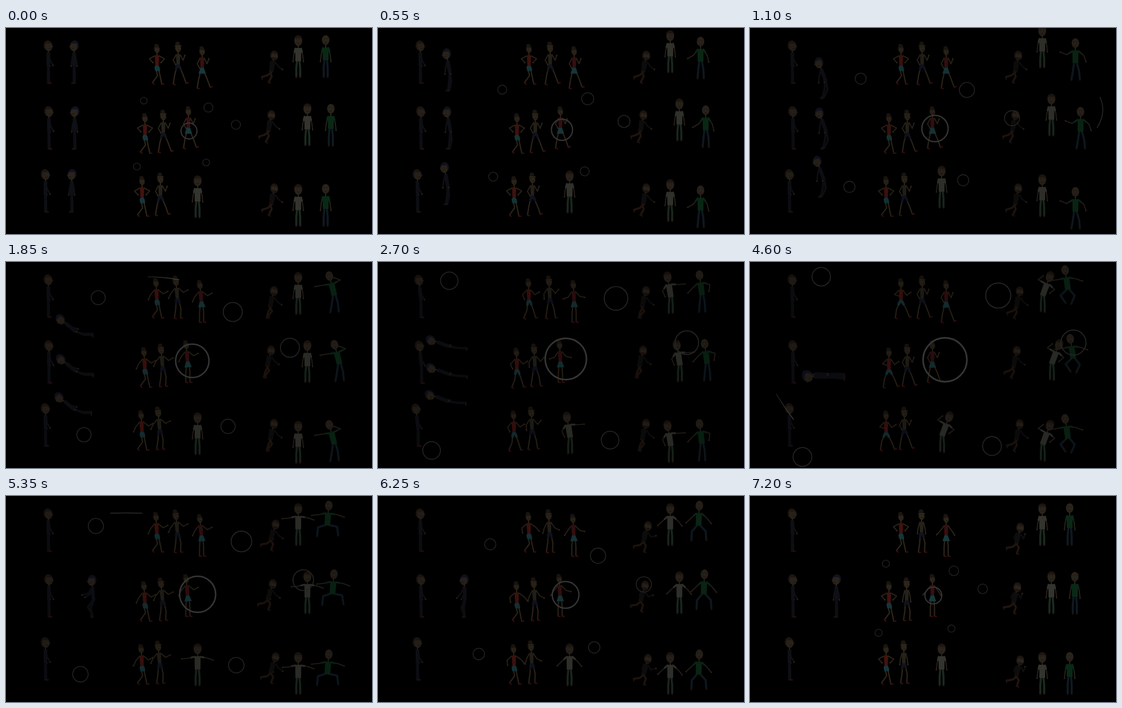
These frames come from a looping animation (640 by 360 pixels, 7.25 s). An HTML page with a canvas:

```html
<!DOCTYPE html>
<html lang="en">
<head>
<meta charset="utf-8">
<title>Dancing people and rings</title>
<style>
html, body { margin: 0; width: 100%; height: 100%; overflow: hidden; background: #000; }
canvas { display: block; width: 640px; height: 360px; }
</style>
</head>
<body>
<canvas id="stage" width="640" height="360"></canvas>
<script>
const ctx = document.getElementById('stage').getContext('2d');
const LOOP = 7250, PEAK = 3830;
const BEATS = [0, 1100, 1850, 3550, 4600, 5350, 7200];

// Limb angles in degrees from straight down, positive to the right:
// left upper, left lower, right upper, right lower
const ARMS = {
  hang: [-14, -6, 14, 6],
  front: [0, 18, 8, 30],
  hips: [-62, 42, 62, -42],
  tuck: [-28, 30, 28, 160],
  jog: [-45, 72, 35, 125],
  dance: [-38, -24, 50, 118],
  flare: [-38, -42, 36, 32],
  offer: [-28, -118, 34, 38],
  low: [-8, 30, 34, 54],
  wide: [-78, -84, 80, 70],
  sway: [-48, 56, 162, 184],
  pose: [-118, 128, 48, -52],
  box: [-58, -112, 52, 20],
  point: [-82, -80, 116, -110],
  open: [-16, -4, 30, 92],
  fly: [62, 74, 42, 58],
  flat: [88, 92, 82, 96],
  reach: [-35, -75, -24, -58]
};
const LEGS = {
  straight: [-5, 0, 5, 0],
  close: [0, 0, 2, 1],
  step: [12, -36, 12, 12],
  stride: [-14, -9, 23, 20],
  wide: [-22, -8, 28, 22],
  amble: [-4, -8, 13, -2],
  kneel: [14, -28, -48, -72],
  perch: [30, -40, -30, -14],
  run: [34, -18, -52, -80],
  stoop: [-6, -14, 10, -26],
  trail: [75, 92, 66, 88],
  lie: [88, 84, 92, 88],
  squat: [-36, 32, -20, 14],
  lean: [-8, -10, 16, 6],
  jump: [-46, 34, 40, -24],
  lunge: [-72, -6, 78, 8]
};

// One beat: arms, legs, shift of the hips, lean to the left
const beat = (arms, legs, x = 0, y = 0, lean = 0) =>
  [x, y, lean, ...ARMS[arms], ...LEGS[legs]];

const upright = beat('front', 'close');
const akimbo = beat('hips', 'step');
const skip = beat('dance', 'step', 0, 0, 3);
const jog = beat('jog', 'wide');
const walk = beat('tuck', 'stride');
const reach = beat('dance', 'amble', -1, 0, 5);
const bounce = beat('dance', 'straight', -1, 0, 5);
const kneel = beat('low', 'kneel', 0, 0, -11);
const perch = beat('low', 'perch', -2, 2, -14);
const idle = beat('hang', 'straight');

// size: neck, torso, upper arm, forearm, thigh, shin
const man = { skin: '#2a231b', hair: '#1d1510', shoe: '#1e1310', face: 0,
  head: [7.2, 9], size: [14, 21, 12, 11, 14, 14], wide: 11 };
const suited = { ...man, top: '#0f1016', leg: '#0e0f14', sleeve: 1,
  head: [7, 9], size: [13, 21, 12, 11, 16, 15], wide: 7 };
const woman = { skin: '#2f261a', hair: '#1c1610', leg: '#2f261a', shoe: '#3c0f12', face: .5,
  bun: 2.5, head: [4.8, 6.3], size: [12, 20, 11, 9, 15, 15], wide: 8 };

const faller = { ...suited, hair: '#12121f', face: -1, hip: [120, 211], beats: [
  beat('hang', 'close'), beat('hang', 'stoop', 13, 0, 20), beat('fly', 'trail', 2, -13, 50),
  beat('flat', 'lie', 7, -9, 88), beat('flat', 'lie', 14, -10, 88),
  beat('reach', 'squat', 33, 0, 5), beat('hang', 'close', 31)] };

const people = [
  { ...suited, skin: '#28211a', shoe: '#300d10', face: 1, hip: [74, 96],
    rows: [[0, 0], [1, 115], [-5, 225]],
    beats: [upright, upright, upright, beat('front', 'close', 2, 1, 11), upright, upright, upright] },
  faller,
  { ...woman, top: '#42130f', shorts: '#17363a', hip: [264, 98], rows: [[0, 0], [-21, 121], [-26, 231]],
    beats: [akimbo, akimbo, skip, jog, jog, skip, akimbo] },
  { ...woman, top: '#24221a', shorts: '#11131f', bun: 4, band: '#35301f', head: [5.3, 7],
    size: [12, 20, 11, 9, 16, 16], hip: [301, 98], rows: [[0, 0], [-26, 119], [-31, 229]],
    beats: [walk, walk, reach, walk, walk, reach, beat('hang', 'amble', -1)] },
  { ...woman, top: '#361012', skirt: '#18383b', size: [12, 21, 11, 9, 16, 16], hip: [343, 105],
    rows: [[0, 0], [-24, 105]],
    beats: [walk, walk, bounce, beat('offer', 'straight', 1), walk, bounce, beat('flare', 'straight')] },
  { ...man, top: '#0e0d0e', leg: '#21150f', sleeve: 1, beard: 1, face: .7, head: [6.5, 8],
    size: [11, 16, 9, 9, 11, 11], wide: 9, hip: [464, 95], rows: [[0, 0], [-5, 104], [0, 232]],
    beats: [kneel, kneel, perch, perch, beat('low', 'kneel', 2, 3, -12),
      beat('low', 'run', -1, 0, -18), beat('tuck', 'run', 2, 6, -14)] },
  { ...man, top: '#34342f', leg: '#1c2a20', shoe: '#2e1714', hip: [511, 85],
    rows: [[0, 0], [16, 119], [0, 260], [-176, 245]],
    beats: [idle, beat('hang', 'straight', 0, -17), beat('hang', 'straight', 0, 5),
      beat('sway', 'straight', 2, 2, 18), beat('pose', 'straight', 1, 1, -20),
      beat('wide', 'straight'), idle] },
  { ...man, top: '#0a2816', leg: '#0f1a22', bald: 1, size: [14, 20, 12, 12, 15, 15], hip: [559, 85],
    rows: [[0, 0], [9, 120], [0, 260]],
    beats: [idle, beat('box', 'lean', 10, 5), beat('point', 'lean', 15, 2, 14),
      beat('open', 'straight', 0, 1), beat('wide', 'jump', -3, -12, 8),
      beat('wide', 'lunge', 3, -15, -4), idle] }
];

// Offset from the hub and radius at scale 1
const RINGS = [[0, 0, 14], [-79, -53, 5.9], [34, -41, 8], [82, -11, 8], [-91, 62, 6], [30, 55, 6]];

// Start, bend and end points, then drift per second
const STREAKS = [
  { at: 1100, p: [612, 121, 624, 147, 607, 174], v: [3, 4] },
  { at: 1850, p: [248, 26, 276, 26, 302, 31], v: [40, 6], tail: 1 },
  { at: 3550, p: [597, 251, 621, 282, 591, 295], v: [10, 4] },
  { at: 4600, p: [46, 231, 60, 254, 76, 275], v: [-60, -70], tail: 1 },
  { at: 5350, p: [183, 30, 210, 29, 238, 30], v: [-50, 0] }
];

const lerp = (a, b, k) => a + (b - a) * k;
const between = (a, b, k) => [lerp(a[0], b[0], k), lerp(a[1], b[1], k)];
const smooth = k => { k = Math.max(0, Math.min(1, k)); return k * k * (3 - 2 * k); };
const rad = deg => deg * Math.PI / 180;
const step = (p, len, deg) => [p[0] + len * Math.sin(rad(deg)), p[1] + len * Math.cos(rad(deg))];

function poseAt(beats, t) {
  let i = 0;
  while (i < BEATS.length - 2 && t >= BEATS[i + 1]) i++;
  const k = smooth((t - BEATS[i]) / (BEATS[i + 1] - BEATS[i]));
  return beats[i].map((v, n) => lerp(v, beats[i + 1][n], k));
}

function line(color, width, ...pts) {
  ctx.strokeStyle = color;
  ctx.lineWidth = width;
  ctx.beginPath();
  pts.forEach(p => ctx.lineTo(p[0], p[1]));
  ctx.stroke();
}

function oval(color, x, y, rx, ry, from = 0, to = Math.PI * 2) {
  ctx.fillStyle = color;
  ctx.beginPath();
  ctx.ellipse(x, y, rx, ry, 0, from, to);
  ctx.fill();
}

// Tapered body part from a to b
function slab(color, a, b, wa, wb) {
  const len = Math.hypot(b[0] - a[0], b[1] - a[1]) || 1;
  const nx = (b[1] - a[1]) / len / 2, ny = (a[0] - b[0]) / len / 2;
  ctx.fillStyle = color;
  ctx.beginPath();
  ctx.moveTo(a[0] + nx * wa, a[1] + ny * wa);
  ctx.lineTo(b[0] + nx * wb, b[1] + ny * wb);
  ctx.lineTo(b[0] - nx * wb, b[1] - ny * wb);
  ctx.lineTo(a[0] - nx * wa, a[1] - ny * wa);
  ctx.fill();
}

function drawLeg(c, hip, thigh, shin, dir) {
  const knee = step(hip, c.size[4], thigh), foot = step(knee, c.size[5], shin);
  line(c.leg, c.bun ? 2.2 : 3.6, hip, knee, foot);
  if (c.shorts) line(c.shorts, 4.4, hip, between(hip, knee, .35));
  line(c.shoe, 2.2, foot, step(foot, dir ? 3.6 : 1.5, shin + 82 * dir));
}

function drawArm(c, from, upper, fore) {
  const elbow = step(from, c.size[2], upper), hand = step(elbow, c.size[3], fore);
  line(c.skin, 1.8, from, elbow, hand);
  if (c.sleeve) line(c.top, 2.6, from, elbow, between(elbow, hand, .8));
  else if (!c.bun) line(c.top, 3.2, from, between(from, elbow, .5));
  oval(c.skin, hand[0], hand[1], 1.4, 1.4);
}

function drawHead(c, x, y, tilt) {
  const [rx, ry] = c.head, f = c.face, profile = Math.abs(f) === 1;
  ctx.save();
  ctx.translate(x, y);
  ctx.rotate(-rad(tilt));
  if (c.bun) oval(c.hair, -f * 2, -ry, rx * .75, c.bun);
  if (!c.bald) oval(c.hair, -f * 1.2, -.5, rx, ry);
  oval(c.skin, f * .8, c.bald ? 0 : 1, rx - .6, ry - .6);
  if (!c.bald) oval(c.hair, -f * .8, -ry * .45, rx * .92, ry * .52, Math.PI, Math.PI * 2);
  if (c.band) line(c.band, 1.2, [-rx, -ry * .5], [rx, -ry * .5]);
  if (c.beard) oval(c.hair, f, ry * .45, rx - 1, ry * .55, 0, Math.PI);
  const gap = rx * .36, mid = f * rx * .4;
  for (const s of profile ? [f] : [-1, 1]) {
    const ex = mid + s * gap;
    oval('#35322b', ex, -.2, 1.3, 1.1);
    oval('#080706', ex + f * .3, -.2, .6, .6);
    line(c.hair, .7, [ex - 1.3, -2.2], [ex + 1.3, -2.2]);
  }
  line('#140d0b', .7, [mid - 1.5, ry * .52], [mid + 1.5, ry * .52]);
  if (profile) oval(c.skin, f * rx, 1.5, 1.4, 1);
  ctx.restore();
}

function drawPerson(c, pose, dx, dy) {
  const [px, py, lean, la, lf, ra, rf, lt, ls, rt, rs] = pose;
  const drop = (thigh, shin) => c.size[4] * Math.cos(rad(thigh)) + c.size[5] * Math.cos(rad(shin));
  // The lower foot rests on the ground line
  const hip = [c.hip[0] + px + dx, c.hip[1] + py + dy - Math.max(drop(lt, ls), drop(rt, rs))];
  const chest = step(hip, -c.size[1], lean), head = step(chest, -c.size[0], lean * 1.1);
  const profile = Math.abs(c.face) === 1, dir = Math.sign(c.face);
  const arm = s => step(chest, s * (profile ? 1 : c.wide / 2 - .5), lean + 90);
  const leg = s => step(hip, s * (profile ? .6 : 2.2), lean + 90);
  drawArm(c, arm(-1), la, lf);
  drawLeg(c, leg(-1), lt, ls, dir);
  drawLeg(c, leg(1), rt, rs, dir);
  line(c.skin, 2.2, head, chest);
  slab(c.top, step(chest, -1, lean), step(hip, 1, lean), c.wide - .5, c.wide - (c.bun ? 2.5 : 1));
  if (c.shorts) slab(c.shorts, between(chest, hip, .86), step(hip, 3, lean), 6, 8);
  if (c.skirt) slab(c.skirt, between(chest, hip, .8), step(hip, 6, lean), 6, 13);
  drawArm(c, arm(1), ra, rf);
  drawHead(c, head[0], head[1], lean * .9);
}

// Rings spread from a drifting hub, then gather again along another path
function drawRings(t) {
  const k = t < PEAK ? t / PEAK : (LOOP + 30 - t) / (LOOP + 30 - PEAK);
  const scale = 1 + 2.24 * k, turn = smooth((t - 3550) / 750);
  const hx = 320 + lerp(12, 27, turn) * k;
  const hy = 180 + lerp(-15 * k, -6 - 4 * k, turn);
  RINGS.forEach(([x, y, r], i) => {
    ctx.strokeStyle = i ? '#262626' : '#363636';
    ctx.lineWidth = (i ? .9 : 1.4) + r * scale * .038;
    ctx.beginPath();
    ctx.arc(hx + x * scale, hy + y * scale, r * scale, 0, Math.PI * 2);
    ctx.stroke();
  });
}

function drawStreak({ at, p, v, tail }, t) {
  const age = t - at, fade = 1 - Math.abs(age) / 300;
  if (fade <= 0) return;
  const [x0, y0, x1, y1, x2, y2] = p;
  const glow = ctx.createLinearGradient(x0, y0, x2, y2);
  glow.addColorStop(0, tail ? '#1c1c1c' : '#2a2a2a');
  glow.addColorStop(1, tail ? '#424038' : '#2a2a2a');
  ctx.save();
  ctx.translate(v[0] * age / 1000, v[1] * age / 1000);
  ctx.globalAlpha = Math.min(1, fade * 1.5);
  ctx.strokeStyle = glow;
  ctx.lineWidth = 1.4;
  ctx.beginPath();
  ctx.moveTo(x0, y0);
  ctx.quadraticCurveTo(x1, y1, x2, y2);
  ctx.stroke();
  ctx.restore();
}

function draw(t) {
  ctx.fillStyle = '#000';
  ctx.fillRect(0, 0, 640, 360);
  ctx.lineCap = ctx.lineJoin = 'round';

  // The three fallers close in on the middle row
  const gap = Math.max(0, 1 - t / 4700);
  faller.rows = gap ? [[-gap, -115 * gap], [-5 * gap, 110 * gap], [0, 0]] : [[0, 0]];

  for (const c of people) {
    const pose = poseAt(c.beats, t);
    for (const [dx, dy] of c.rows) drawPerson(c, pose, dx, dy);
  }
  ctx.fillStyle = `rgba(0,0,0,${.26 * Math.sin(Math.PI * t / LOOP)})`;
  ctx.fillRect(0, 0, 640, 360);

  drawRings(t);
  STREAKS.forEach(s => drawStreak(s, t));
}

const start = performance.now();
function tick() {
  draw((performance.now() - start) % LOOP);
  requestAnimationFrame(tick);
}
tick();
</script>
</body>
</html>
```
